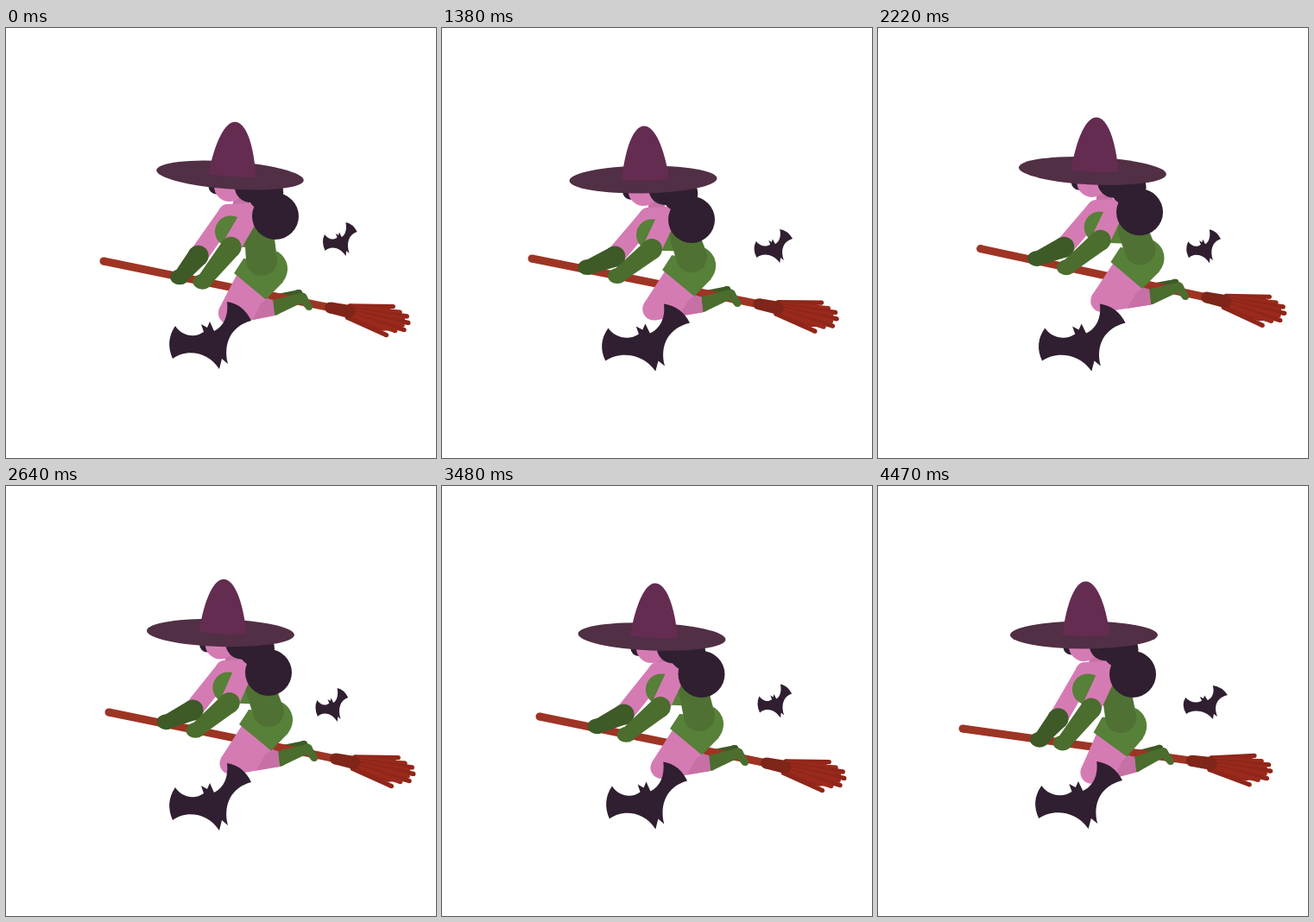
Animation of 498 by 498 pixels, one loop 4.5 s. Source, as an HTML page with a canvas:

```html
<!DOCTYPE html>
<html lang="en">
<head>
<meta charset="utf-8">
<title>Witch on a broom</title>
<style>
html, body { margin: 0; width: 100%; height: 100%; overflow: hidden; background: #fff; }
canvas { display: block; width: 498px; height: 498px; }
</style>
</head>
<body>
<canvas id="stage" width="498" height="498"></canvas>
<script>
const ctx = document.getElementById('stage').getContext('2d');
const LOOP = 4500, STEP = 30;
const C = {
  skin: '#d57bb4', shade: '#c670a6', hair: '#2f1f30', brim: '#512f45', cone: '#642c51',
  light: '#578038', dress: '#4f7133', glove: '#4b6d2e', dark: '#3d5a27',
  wood: '#9e3424', bind: '#7f2519', straw: '#90261a'
};

// time, broom x, y, angle, hat x, y, angle, hair offset x, y, grip slide
const BODY = [
  [0, 113, 270, 11.6, 259.5, 170.5, 4, 52.5, 47.5, 1],
  [120, 115.5, 270, 11.4, 260, 169, 4, 53, 47.5, 1],
  [720, 97, 289, 7.4, 234.5, 179.5, -1, 57.5, 44.5, .88],
  [1380, 104, 267, 11.35, 233, 175.5, -1, 56, 46.5, 0],
  [1800, 110, 256, 12.2, 240.5, 165.5, 3, 54.5, 48.5, .05],
  [2160, 118, 255, 12.2, 248, 165, 2.8, 54.5, 48, .05],
  [2640, 119, 262, 11.6, 248.5, 170, 1.7, 55.5, 46, .1],
  [3060, 120, 258, 12, 248.5, 167.5, 2.5, 55.5, 46, .1],
  [3480, 113, 267, 11.6, 243, 174.5, 2.3, 57.5, 43.5, .1],
  [4150, 102, 274, 9.3, 240, 170, 1, 56.5, 45, .8],
  [4470, 98, 281, 8, 238.5, 172.5, 0, 56.5, 45.5, 1]
];
// time, large bat left, top, width, small bat left, top, width
const BATS = [
  [0, 189, 317, 95, 366.5, 225, 41],
  [720, 186, 318, 102, 351, 233, 46],
  [1380, 185, 319.5, 102, 361, 233, 46],
  [1800, 183, 318, 106, 357, 232, 44],
  [2640, 189, 321, 95, 358, 234, 39],
  [3480, 190, 319.5, 94, 365, 229.5, 41],
  [4470, 182, 319, 101, 353, 231, 53]
];

// Cubic Hermite through unevenly spaced keys.
function sample(keys, t) {
  const last = keys.length - 1;
  let i = 0;
  while (i < last - 1 && t >= keys[i + 1][0]) i++;
  const a = keys[i], b = keys[i + 1];
  const p = keys[Math.max(0, i - 1)], n = keys[Math.min(last, i + 2)];
  const d = b[0] - a[0], u = Math.min(1, (t - a[0]) / d), v = 1 - u;
  return a.slice(1).map((_, j) => {
    const k = j + 1;
    const ma = (b[k] - p[k]) / (b[0] - p[0]) * d;
    const mb = (n[k] - a[k]) / (n[0] - a[0]) * d;
    return (1 + 2 * u) * v * v * a[k] + u * v * v * ma
      + u * u * (3 - 2 * u) * b[k] - u * u * v * mb;
  });
}

const rad = deg => deg * Math.PI / 180;
const add = (p, x, y) => [p[0] + x, p[1] + y];
const mix = (p, q, u) => [p[0] + (q[0] - p[0]) * u, p[1] + (q[1] - p[1]) * u];
function turn(p, angle, x, y) {
  const c = Math.cos(angle), s = Math.sin(angle);
  return add(p, x * c - y * s, x * s + y * c);
}
function oval(p, rx, ry, color, angle = 0) {
  ctx.fillStyle = color;
  ctx.beginPath();
  ctx.ellipse(p[0], p[1], rx, ry, angle, 0, 7);
  ctx.fill();
}
const disc = (p, r, color) => oval(p, r, r, color);
function poly(points, color) {
  ctx.fillStyle = color;
  ctx.beginPath();
  points.forEach(p => ctx.lineTo(p[0], p[1]));
  ctx.fill();
}
// Tapered limb with round ends.
function limb(p, q, r1, r2, color) {
  const a = Math.atan2(q[1] - p[1], q[0] - p[0]);
  disc(p, r1, color);
  disc(q, r2, color);
  poly([turn(p, a, 0, -r1), turn(q, a, 0, -r2), turn(q, a, 0, r2), turn(p, a, 0, r1)], color);
}

function drawBroom(p, angle) {
  const at = (x, y) => turn(p, angle, x, y);
  limb(at(0, 0), at(268, 0), 4.5, 4.5, C.wood);
  poly([at(288, -8), at(335, -13), at(355, -8), at(354, 8), at(333, 14), at(288, 8)], C.straw);
  const tips = [[339, -16], [348, -11], [357, -8], [353, -4], [360, -1], [354, 3], [357, 8], [347, 11], [338, 18]];
  tips.forEach(([x, y], i) =>
    limb(at(290, y * .38), at(x, y), 3, 2.6, i % 2 ? '#9b2a1c' : C.straw));
  limb(at(268, 0), at(290, 0), 6.5, 7.5, C.bind);
}

function drawHat(p, angle) {
  ctx.save();
  ctx.translate(p[0], p[1]);
  ctx.rotate(angle);
  oval([0, 0], 85.5, 16, C.brim);
  ctx.fillStyle = C.cone;
  ctx.beginPath();
  ctx.moveTo(-25, 0);
  ctx.bezierCurveTo(-20, -38, -10, -62, 2, -62);
  ctx.bezierCurveTo(14, -62, 25, -38, 30, 0);
  ctx.quadraticCurveTo(2, 3, -25, 0);
  ctx.fill();
  ctx.restore();
}

function drawArm(shoulder, elbow, hand, color) {
  limb(shoulder, elbow, 11, 11, C.skin);
  limb(elbow, hand, 12, 8.5, color);
  oval(add(hand, -1, 0), 11, 9, color);
}

function drawWitch(t) {
  const [bx, by, bDeg, hx, hy, hDeg, ox, oy, slide] = sample(BODY, t);
  const broom = [bx, by], tilt = rad(bDeg), hat = [hx, hy], nod = rad(hDeg);
  const curl = add(hat, ox, oy);
  const onBroom = (x, y) => turn(broom, tilt, x, y);
  const onHat = (x, y) => turn(hat, nod, x, y);
  const ease = (a, b) => a + (b - a) * slide;

  const hip = onBroom(188, -29.4);
  const onHip = (x, y) => turn(hip, tilt - rad(11.5), x, y);
  const farHand = onBroom(ease(66, 91), ease(-3, 0));
  const farElbow = add(farHand, ease(31, 20.5), ease(-12.5, -24.5));
  const nearHand = onBroom(ease(102, 118), 0);
  const nearElbow = add(nearHand, ease(39, 32), ease(-31, -40));
  const farShoulder = add(curl, ease(-50, -55), -3);
  const nearShoulder = add(curl, -28, -4);
  const chest = add(curl, ease(-8, -19), 19.5);
  const waist = add(hip, ease(-5, -7), -10);
  const knee = onBroom(ease(150, 155), 29.5);
  const ankle = onHip(7, 45), heel = onHip(40, 33), toe = onHip(48, 44);
  const hemLeft = onHip(-39, 5), hemRight = onHip(-2, 35.5);

  limb(onHip(6, 35), onHip(36, 28), 5, 4, C.dark);
  limb(onHip(36, 28), onHip(42, 36), 4, 3, C.dark);
  drawBroom(broom, tilt);

  limb(onHat(15, 24), add(curl, -40, -1), 9, 11, C.shade);
  limb(farShoulder, nearShoulder, 11, 11, C.skin);
  drawArm(farShoulder, farElbow, farHand, C.dark);
  const bust = add(curl, ease(-46, -52), 17.5);
  limb(bust, add(chest, -4, 2), 18, 15, C.light);
  limb(chest, waist, 17, 18, C.dress);

  limb(ankle, heel, 9, 5.5, C.glove);
  limb(heel, toe, 5.5, 4, C.glove);
  poly([add(knee, 2, 13), add(ankle, 1, 9), add(ankle, -1, -9), hemRight, knee], C.skin);
  poly([mix(add(knee, 2, 13), add(ankle, 1, 9), .5), add(ankle, 1, 9),
    add(ankle, -1, -9), mix(hemRight, hemLeft, .08)], C.shade);
  disc(knee, 13, C.skin);
  poly([add(knee, -11, -7), add(hemLeft, 4, 0), hemRight, add(knee, 9, 10)], C.skin);

  disc(hip, 23, C.light);
  poly([onHip(-28, -12), hemLeft, hemRight, onHip(18, 15), onHip(0, -10)], C.light);
  disc(waist, 18, C.dress);
  drawArm(nearShoulder, nearElbow, nearHand, C.glove);

  disc(onHat(-15, 14), 9, C.hair);
  disc(onHat(0, 13), 17.5, C.skin);
  disc(onHat(25, 11), 19, C.hair);
  disc(onHat(42, 17), 21, C.hair);
  disc(curl, 27, C.hair);
  drawHat(hat, nod);
}

function drawBat(x, y, sx, sy, shear) {
  ctx.save();
  ctx.translate(x, y);
  ctx.transform(sx, 0, shear * sx, sy, -shear * sx * 39, 0);
  ctx.fillStyle = C.hair;
  ctx.beginPath();
  ctx.moveTo(7, 28);
  ctx.quadraticCurveTo(-5, 46, 4, 66);
  ctx.bezierCurveTo(18, 55, 44, 56, 58, 78);
  ctx.lineTo(61, 66);
  ctx.lineTo(68, 72);
  ctx.bezierCurveTo(62, 48, 72, 28, 95, 22);
  ctx.quadraticCurveTo(86, 3, 67, 0);
  ctx.bezierCurveTo(69, 16, 63, 29, 52, 34);
  ctx.lineTo(47, 23);
  ctx.lineTo(44, 30);
  ctx.lineTo(37, 26);
  ctx.lineTo(40, 35);
  ctx.bezierCurveTo(29, 43, 14, 39, 7, 28);
  ctx.fill();
  ctx.restore();
}

function draw(t) {
  ctx.fillStyle = '#fff';
  ctx.fillRect(0, 0, 498, 498);
  drawWitch(t);
  const [x, y, w, sx, sy, sw] = sample(BATS, t);
  drawBat(sx, sy, sw / 95, .5, .12);
  drawBat(x, y, w / 95, 1, 0);
}

const start = performance.now();
function tick() {
  const t = Math.max(0, performance.now() - start) % LOOP;
  draw(Math.floor(t / STEP) * STEP);
  requestAnimationFrame(tick);
}
tick();
</script>
</body>
</html>
```
